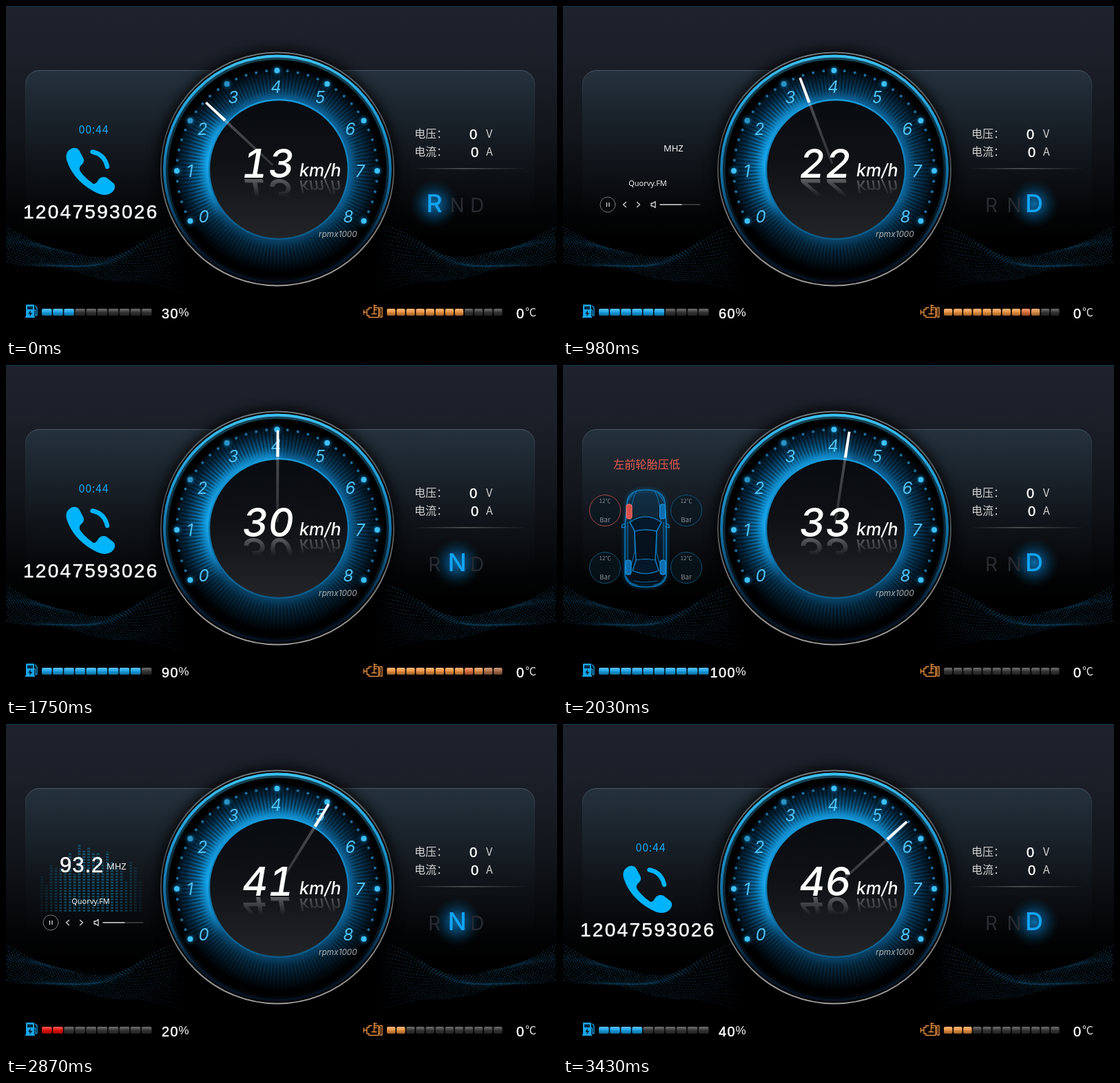
Recreate the animation shown at these times as an HTML page with a canvas. Size 800 px wide and 480 px high, loop 3.5 s.

```html
<!DOCTYPE html>
<html lang="zh">
<head>
<meta charset="utf-8">
<title>Dashboard</title>
<style>
html, body { margin: 0; width: 100%; height: 100%; overflow: hidden; background: #000; }
#stage { position: relative; width: 800px; height: 480px; overflow: hidden;
  background: linear-gradient(#1e222d 0, #1b1f28 80px, #12151b 190px, #050608 290px, #000 340px); }
#stage > * { position: absolute; left: 0; top: 0; }
#stage > .ring { left: 226px; top: 67px; width: 340px; height: 340px; border-radius: 50%; }
#base { background: radial-gradient(circle, #0000 100px, #0c639a 102px, #084870 113px, #04263e 130px, #0000 150px);
  -webkit-mask: conic-gradient(#000 0 110deg, #000a 150deg 215deg, #000 250deg);
  mask: conic-gradient(#000 0 110deg, #000a 150deg 215deg, #000 250deg); }
#streaks { background: repeating-conic-gradient(#0000 0 .8deg, #0006 1.2deg 1.8deg, #0000 2.4deg);
  -webkit-mask: radial-gradient(circle, #0000 106px, #000 118px 140px, #0000 152px);
  mask: radial-gradient(circle, #0000 106px, #000 118px 140px, #0000 152px); }
#lit { background: radial-gradient(circle, #0000 100px, #18acf2 102px, #0f90d2 111px, #075888 125px, #042d4a 137px, #0000 152px); }
text { white-space: pre; }
.ui { font-family: Inter, sans-serif; }
.num { font-family: "Liberation Sans", Arial, sans-serif; fill: #fff; }
.b { stroke: #fff; stroke-width: .5; }
.cjk { font-family: "Noto Sans CJK SC", "Noto Sans CJK", sans-serif; }
.hum { font-family: "Open Sans", sans-serif; fill: #fff; }
.it { font-style: italic; }
.mid { text-anchor: middle; }
.end { text-anchor: end; }
.big { font-size: 58px; font-weight: 500; font-variant-numeric: tabular-nums; }
.unit { font-size: 25px; font-weight: 500; }
.line { fill: none; stroke-linecap: round; stroke-linejoin: round; }
</style>
</head>
<body>
<div id="stage">
<svg width="800" height="480">
  <defs>
    <linearGradient id="panel" x2="0" y2="1"><stop stop-color="#25313c"/><stop offset=".35" stop-color="#192129"/><stop offset="1" stop-color="#0a0c10" stop-opacity="0"/></linearGradient>
    <linearGradient id="edge" x2="0" y2="1"><stop stop-color="#4b5a66"/><stop offset=".15" stop-color="#3a4650" stop-opacity=".4"/><stop offset=".6" stop-color="#333" stop-opacity="0"/></linearGradient>
    <filter id="soft" x="-20%" y="-20%" width="140%" height="140%"><feGaussianBlur stdDeviation="9"/></filter>
  </defs>
  <rect width="800" height="1" fill="#0d3a52"/>
  <rect x="28.5" y="93.5" width="739" height="215" rx="20" fill="url(#panel)" stroke="url(#edge)"/>
</svg>
<canvas id="waves" width="800" height="480"></canvas>
<svg width="800" height="480">
  <circle cx="394" cy="237" r="174" filter="url(#soft)" opacity=".85"/>
  <circle cx="394" cy="236.5" r="169"/>
</svg>
<div id="base" class="ring"></div>
<div id="lit" class="ring"></div>
<div id="streaks" class="ring"></div>
<svg width="800" height="480">
  <defs>
    <linearGradient id="rim" x2="0" y2="1"><stop stop-color="#70777d"/><stop offset=".4" stop-color="#3c4044"/><stop offset=".75" stop-color="#777"/><stop offset="1" stop-color="#a0a0a0"/></linearGradient>
    <linearGradient id="halo" x2="0" y2="1"><stop stop-color="#3cc0f2"/><stop offset=".3" stop-color="#2098d0"/><stop offset=".6" stop-color="#125f8c"/><stop offset=".85" stop-color="#06192c"/><stop offset="1" stop-color="#050f1d"/></linearGradient>
    <linearGradient id="face" x2="0" y2="1"><stop stop-color="#080b10"/><stop offset=".45" stop-color="#0f1115"/><stop offset="1" stop-color="#232428"/></linearGradient>
    <linearGradient id="inner" x2="0" y2="1"><stop stop-color="#189ad8"/><stop offset=".6" stop-color="#0f75ab"/><stop offset="1" stop-color="#0b5a87"/></linearGradient>
    <linearGradient id="shaft" gradientUnits="userSpaceOnUse" x1="0" y1="-8" x2="0" y2="-105"><stop stop-color="#fff" stop-opacity=".14"/><stop offset="1" stop-color="#fff" stop-opacity=".26"/></linearGradient>
    <linearGradient id="fade" gradientUnits="userSpaceOnUse" x1="0" y1="250" x2="0" y2="277"><stop stop-color="#fff" stop-opacity=".32"/><stop offset="1" stop-color="#fff" stop-opacity="0"/></linearGradient>
    <mask id="mirror" maskUnits="userSpaceOnUse" x="330" y="250" width="170" height="30"><rect x="330" y="250" width="170" height="30" fill="url(#fade)"/></mask>
    <linearGradient id="rule"><stop stop-color="#888" stop-opacity="0"/><stop offset=".45" stop-color="#8a8a8a" stop-opacity=".6"/><stop offset="1" stop-color="#888" stop-opacity="0"/></linearGradient>
    <radialGradient id="auraFill"><stop stop-color="#0a80c8" stop-opacity=".8"/><stop offset=".45" stop-color="#06609c" stop-opacity=".5"/><stop offset="1" stop-color="#034" stop-opacity="0"/></radialGradient>
    <linearGradient id="eqFill" gradientUnits="userSpaceOnUse" x1="48" y1="0" x2="200" y2="0"><stop stop-color="#13769c" stop-opacity=".1"/><stop offset=".3" stop-color="#13769c" stop-opacity=".6"/><stop offset=".7" stop-color="#13769c" stop-opacity=".6"/><stop offset="1" stop-color="#13769c" stop-opacity=".1"/></linearGradient>
    <linearGradient id="gloss" x2="0" y2="1"><stop stop-color="#fff" stop-opacity=".3"/><stop offset=".45" stop-color="#fff" stop-opacity=".05"/><stop offset=".5" stop-color="#000" stop-opacity=".05"/><stop offset="1" stop-color="#000" stop-opacity=".35"/></linearGradient>
    <linearGradient id="glass" x2="0" y2="1"><stop stop-color="#0b5a92" stop-opacity=".3"/><stop offset="1" stop-color="#063055" stop-opacity=".2"/></linearGradient>
    <filter id="blur" x="-60%" y="-60%" width="220%" height="220%"><feGaussianBlur stdDeviation="2.5"/></filter>
  </defs>

  <g fill="none">
    <circle cx="394" cy="236.5" r="169" stroke="url(#rim)" stroke-width="2"/>
    <circle cx="394" cy="236.5" r="162" stroke="url(#halo)" stroke-width="7" opacity=".35"/>
    <circle cx="394" cy="236.5" r="164" stroke="url(#halo)" stroke-width="4"/>
  </g>
  <circle cx="396" cy="237" r="101" fill="url(#face)" stroke="url(#inner)" stroke-width="2.4"/>
  <g id="dots"></g>
  <g id="marks" class="ui it mid" font-size="24" fill="#4fc4f5"></g>
  <text class="ui it" x="454" y="335" font-size="11.8" fill="#b0b0b0">rpmx1000</text>
  <g id="needle">
    <path d="M-1.6-9H1.6L2.1-105H-2.1Z" fill="url(#shaft)"/>
    <path d="M-2.2-104H2.2L1.8-142H-1.8Z" fill="#fff"/>
  </g>
  <g class="ui it" fill="#fff">
    <text class="big end speed" x="418" y="249">13</text>
    <text class="unit" x="426" y="247">km/h</text>
    <g mask="url(#mirror)">
      <g transform="matrix(1 0 0 -1 0 500)">
        <text class="big end speed" x="418" y="249">13</text>
        <text class="unit" x="426" y="247">km/h</text>
      </g>
    </g>
  </g>

  <g class="cjk" font-size="16" font-weight="300" fill="#d2d2d2">
    <text x="593" y="191">电压：</text><text x="593" y="217">电流：</text>
    <text x="697" y="191">V</text><text x="697" y="217">A</text>
  </g>
  <g class="num b" font-size="20"><text x="673" y="193">0</text><text x="675" y="219">0</text></g>
  <rect x="590" y="235" width="168" height="1.5" fill="url(#rule)"/>

  <circle id="aura" cy="287" r="36" fill="url(#auraFill)"/>
  <g id="gears" class="ui mid"></g>

  <g id="fuel"></g>
  <g id="temp"></g>
  <text id="pct" class="num b end" x="251" y="453" font-size="20" letter-spacing="1.4"></text>
  <text class="num" x="250.5" y="450" font-size="17">%</text>
  <text class="num b" x="741" y="453" font-size="20">0</text>
  <text class="cjk" x="754" y="450" font-size="16" fill="#e8e8e8">℃</text>

  <g fill="#18a8ee">
    <path d="M30 433H40Q41 433 41 434V450H42V452H28V450H29V434Q29 433 30 433Z"/>
    <path d="M31 435.500H39V440H31Z" fill="#052a40"/>
    <path d="M36 441L32 446.500H35L34 450.500L38.500 445H35.500Z" fill="#041a2a"/>
    <path class="line" d="M41 441H42.500V448Q43.500 450 45 448V438L42.500 435" stroke="#18a8ee" stroke-width="1.3"/>
  </g>
  <path class="line" stroke="#e58d3e" stroke-width="1.4" d="M519.500 441V447M519.500 444H524M531 437.500H527V440H524V449H527V451.500H541V437.500H538.500M541 439.500H543V449H541M543 437.500H546V451H543M534.500 433.500V446M534.500 434.500H538M534.500 437.500H537.500M534.500 440.500H538M531 446.500H538"/>

  <g id="phone">
    <text class="cjk" x="105.500" y="185" font-size="16" font-weight="500" letter-spacing=".8" fill="#14a9ef">00:44</text>
    <path fill="#00b4fc" d="M93 208C97 205 103 205 106 209L112 220C114 224 113 228 109 231C106 234 106 237 108 240C113 247 120 253 127 258C130 258 132 256 134 252C137 248 142 247 146 249L155 256C159 259 159 264 156 268C150 275 142 275 134 272C112 262 96 246 89 226C86 218 87 212 93 208Z"/>
    <path class="line" d="M125.500 211.500Q143 215 147 233" stroke="#00b4fc" stroke-width="6.5"/>
    <text class="num b" x="25" y="308" font-size="28" letter-spacing="2.300">12047593026</text>
  </g>

  <g id="car">
    <text class="cjk" x="73" y="149.500" font-size="16.200" fill="#e95c52">左前轮胎压低</text>
    <g id="tyres"></g>
    <g class="line" stroke="#0c8fdc" stroke-width="1.2">
      <path d="M93 200C94 186 104 181 120 181S147 186 148 200L150 232V304C149 316 140 322 120 322S91 316 90 304V232Z" stroke-width="3" opacity=".5" filter="url(#blur)"/>
      <path d="M93 200C94 186 104 181 120 181S147 186 148 200L150 232V304C149 316 140 322 120 322S91 316 90 304V232Z" fill="url(#glass)"/>
      <path d="M97 228Q120 212 143 228L136 241Q120 237 104 241Z" fill="#04182a"/>
      <path d="M104 241Q120 237 136 241L134 283Q120 280 106 283Z" fill="#05111c"/>
      <path d="M106 283L101 298Q120 307 139 298L134 283" fill="#04182a"/>
      <path d="M97 228L104 241V272L97 297M143 228L136 241V272L143 297M94 197L102 186M146 197L138 186M106 184Q98 200 98 226M134 184Q142 200 142 226M92 307Q96 318 108 319M148 307Q144 318 132 319M103 313Q120 317 137 313M94 228V298M146 228V298" opacity=".65"/>
      <path d="M90 230L85.500 232V236L91 234.500M150 230L154 232V236L149 234.500"/>
    </g>
    <g stroke-width="1">
      <rect x="92" y="202" width="8" height="21" rx="3" fill="#d8504c" stroke="#ff7a70"/>
      <g fill="#0c6db0" stroke="#1ea2ee">
        <rect x="140.500" y="202" width="8" height="21" rx="3"/>
        <rect x="91" y="283" width="8" height="21" rx="3"/>
        <rect x="141" y="283" width="8" height="21" rx="3"/>
      </g>
    </g>
  </g>

  <g id="radio">
    <path id="eq" fill="none" stroke="url(#eqFill)" stroke-width="3.800" stroke-dasharray="2.400 1.700"/>
    <text id="freq" class="num b" x="78" y="215" font-size="31" letter-spacing="1">93.2</text>
    <text class="hum" x="146" y="211" font-size="13">MHZ</text>
    <text class="hum mid" x="123" y="261" font-size="11">Quorvy.FM</text>
    <g class="line" stroke="#ddd" stroke-width="1.300">
      <circle cx="65" cy="288" r="11" stroke="#777" stroke-width="1"/>
      <path d="M63.500 285.500V290.500M67 285.500V290.500M91.500 284.500L87.500 288L91.500 291.500M107.500 284.500L111.500 288L107.500 291.500M128 286H130.500L134 283.500V292.500L130.500 290H128Z"/>
      <path d="M141 288H199" stroke="#444"/><path d="M141 288H172" stroke="#ccc"/>
    </g>
  </g>
</svg>
</div>
<script>
const $ = id => document.getElementById(id);
const FRAME = 70, FRAMES = 50;
const hash = n => { const s = Math.sin(n * 12.9898) * 43758.5453; return s - Math.floor(s); };
const count = n => [...Array(n).keys()];

function drawWaves() {
  const g = $('waves').getContext('2d');
  for (const side of [0, 1]) for (let r = 0; r < 18; r++) for (let i = 0; i < 62; i++) {
    const v = r / 17, x = i * 4.3 + r * 1.3 % 4.3;
    const top = 320 + 44 * Math.sin(Math.PI * Math.min(x / 246, 1)) ** 1.2 - Math.max(0, x - 246);
    const low = 368 + x * .17;
    const y = top + (low - top) * v + 3 * Math.sin(x / 20 + v * 7);
    const a = (.35 + .4 * hash(r * 97 + i)) * (1 - .7 * v * x / 262) * Math.min(1, Math.max(0, 264 - x) / 30);
    g.fillStyle = `rgba(22,104,152,${a})`;
    g.fillRect(side ? 797 - x : x, y, 1.5, 1.5);
  }
}

function buildDial() {
  $('dots').innerHTML = count(41).map(i => {
    const a = (i * 6 - 120) * Math.PI / 180;
    const pos = `cx="${393.5 + 145.5 * Math.sin(a)}" cy="${239 - 145.5 * Math.cos(a)}"`;
    if (i % 5) return `<circle ${pos} r="2" fill="#1b719f"/>`;
    const tone = i == 10 || i == 15 ? '#2793c6' : '#3cc0f7';
    return `<circle ${pos} r="6" fill="#0a7ab8" opacity=".6" filter="url(#blur)"/><circle ${pos} r="4" fill="${tone}"/>`;
  }).join('');
  const xs = [287, 267, 285, 330, 392, 456, 500, 514, 497];
  const ys = [305, 239, 178, 132, 117, 132, 178, 239, 305];
  $('marks').innerHTML = xs.map((x, i) => `<text x="${x}" y="${ys[i] + 8.5}">${i}</text>`).join('');
}

function buildBar(id, n, x, step, w) {
  $(id).innerHTML = count(n).map(i => {
    const box = `x="${x + i * step}" y="439" width="${w}" height="10" rx="2"`;
    return `<rect ${box} class="cell"/><rect ${box} fill="url(#gloss)"/>`;
  }).join('');
  return [...$(id).querySelectorAll('.cell')];
}

function buildTyres() {
  $('tyres').innerHTML = [[61, 211], [179, 211], [61, 294], [179, 294]].map(([x, y], i) =>
    `<circle cx="${x}" cy="${y}" r="22.5" fill="#0a1a26" fill-opacity=".55" stroke="${i ? '#0f5479' : '#a54a4a'}"/>
     <g class="cjk mid" fill="#8d9297"><text x="${x}" y="${y - 11}" font-size="8">12℃</text>
     <text x="${x}" y="${y + 16.5}" font-size="9.5">Bar</text></g>`).join('');
}

const gearX = [622, 655, 684];
const poses = [[0, -46.9], [6, -34.4], [14, -20.6], [21, -8.3], [29, 8.8], [41, 31.7], [49, 47.8]];

function needleAngle(f) {
  const i = Math.max(1, poses.findIndex(p => p[0] >= f));
  const [f0, a0] = poses[i - 1], [f1, a1] = poses[i];
  return a0 + (a1 - a0) * (f - f0) / (f1 - f0);
}

function tempColor(i) {
  return i < 8 ? '#ee9440' : ['#e0713c', '#de8e48', '#b5744a', '#a86a48'][i - 8];
}

function eqPath(f) {
  const amp = .7 - .3 * Math.cos((f - 21) * .471);
  return count(22).map(i => {
    const env = .45 + .55 * Math.sin(Math.PI * (i + .5) / 22);
    const h = 12 + 100 * amp * env * (.45 + .55 * hash(i * 7.3 + f * 3.1));
    // the tiny slant keeps each bar's gradient box valid
    return `M${52 + i * 6.8} 272v${-h}`;
  }).join('');
}

drawWaves();
buildDial();
buildTyres();
const fuelCells = buildBar('fuel', 10, 52, 16.1, 14.6);
const tempCells = buildBar('temp', 12, 553, 14.1, 12.4);
$('gears').innerHTML = [...'RND'].map((c, i) => `<text x="${gearX[i]}" y="299">${c}</text>`).join('');
const gears = [...$('gears').children];
const speeds = document.querySelectorAll('.speed');

function render(f) {
  const angle = needleAngle(f);
  $('needle').setAttribute('transform', `translate(394 237) rotate(${angle})`);
  const sweep = angle + 130;
  const mask = `conic-gradient(from 230deg, #0000 0, #0009 20deg, #000 45deg, #000c 72deg, #0009 ${Math.max(76, sweep - 6)}deg, #0000 ${sweep + 6}deg)`;
  $('lit').style.webkitMaskImage = $('lit').style.maskImage = mask;

  const speed = Math.floor(13.4 + .68 * f);
  speeds.forEach(s => s.textContent = speed);

  const fuel = Math.floor(3.1 + .25 * f) % 11;
  const fuelColor = fuel < 3 ? '#e8100c' : '#18a4ea';
  fuelCells.forEach((c, i) => c.setAttribute('fill', i < fuel ? fuelColor : '#353535'));
  $('pct').textContent = fuel * 10;

  const tick = Math.floor(.5 + .16 * f);
  const temp = (8 + tick) % 13, gear = tick % 3;
  tempCells.forEach((c, i) => c.setAttribute('fill', i < temp ? tempColor(i) : '#353535'));
  gears.forEach((g, i) => {
    g.setAttribute('fill', i == gear ? '#12a4f4' : '#282b30');
    g.setAttribute('font-size', i == gear ? 36 : 28);
    g.setAttribute('font-weight', i == gear ? 500 : 400);
  });
  $('aura').setAttribute('cx', gearX[gear]);

  const turn = .25 + .13 * f, page = Math.floor(turn);
  ['phone', 'car', 'radio'].forEach((id, i) => $(id).style.display = i == page % 3 ? '' : 'none');
  const tuned = turn - page > .12;
  $('freq').style.display = $('eq').style.display = tuned ? '' : 'none';
  $('eq').setAttribute('d', eqPath(f));
}

let last = -1;
function loop() {
  const f = Math.floor(performance.now() / FRAME) % FRAMES;
  if (f != last) render(last = f);
  requestAnimationFrame(loop);
}
loop();
</script>
</body>
</html>
```
